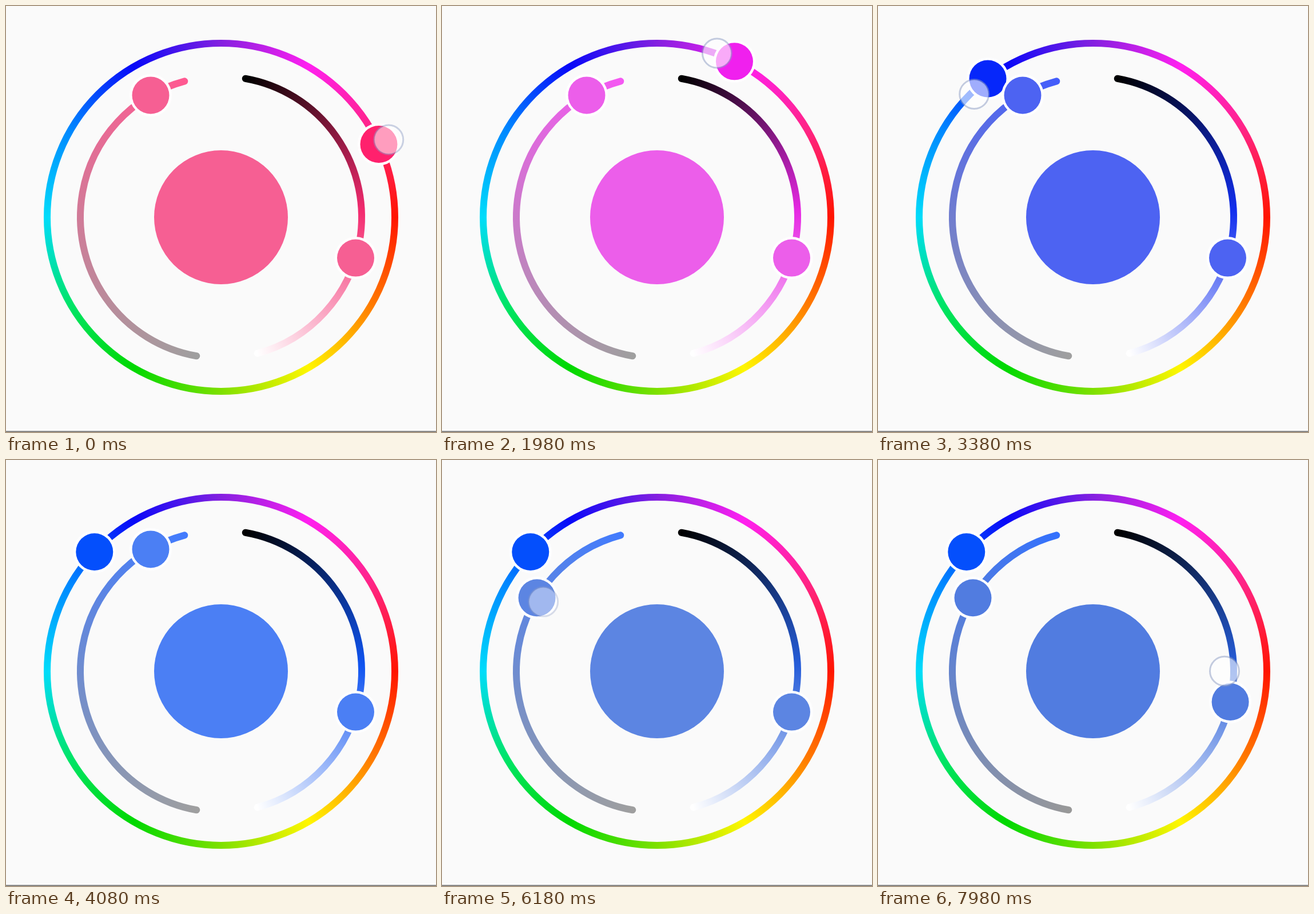
These frames come from a looping animation (752 by 744 pixels, 8 s). An HTML page with a canvas:

```html
<!DOCTYPE html>
<html lang="en">
<head>
<meta charset="utf-8">
<title>Colour wheel</title>
<style>
html, body { margin: 0; width: 100%; height: 100%; overflow: hidden; background: #fafafa; }
canvas { display: block; }
</style>
</head>
<body>
<canvas id="stage" width="752" height="744"></canvas>
<script>
const ctx = document.getElementById('stage').getContext('2d');
const LOOP = 8000, LAG = 200;
const CX = 376, CY = 369, OUTER = 304, INNER = 246, SWEEP = 155;
const LEFT_START = 100, RIGHT_START = -80;
const RAD = Math.PI / 180, TAU = Math.PI * 2;

// Wheel colours, one every 30 degrees
const WHEEL = ['#ff1500', '#ff7a00', '#fff600', '#7ee000', '#00d800', '#00e468',
  '#00dcfa', '#0088ff', '#0808f8', '#8420e0', '#ff20f0', '#ff2484', '#ff1500'];

// Pointer angles while dragging each knob
const HUE_DRAG = [[500, -24.8], [1080, -39.8], [1280, -47.2], [2460, -86.8],
  [2660, -96.5], [3180, -127.2], [3380, -134], [3580, -136.7]];
const HUE_REACH = [[500, 323], [1280, 301], [2660, 309], [3380, 299]];
const SAT_DRAG = [[5560, 240], [5960, 211.4]];
const LIGHT_DRAG = [[7560, 16.8], [7780, 12.6], [7980, 0], [8100, -6]];
const POINTER_ALPHA = [[0, 0.9], [200, 1], [3750, 1], [3950, 0], [5350, 0], [5500, 1],
  [6100, 1], [6350, 0], [7250, 0], [7450, 1]];

const mix = (a, b, k) => a + (b - a) * k;
const rgb = c => `rgb(${c.map(Math.round).join()})`;
const channels = hex => [1, 3, 5].map(n => parseInt(hex.slice(n, n + 2), 16));

function locate(keys, t) {
  let i = 0;
  while (i < keys.length - 2 && t >= keys[i + 1][0]) i++;
  const k = (t - keys[i][0]) / (keys[i + 1][0] - keys[i][0]);
  return [i, Math.min(1, Math.max(0, k))];
}

function linear(keys, t) {
  const [i, k] = locate(keys, t);
  return mix(keys[i][1], keys[i + 1][1], k);
}

// Monotone cubic through the keys, at rest at both ends
function smooth(keys, t) {
  const [i, k] = locate(keys, t);
  const slope = n => (keys[n + 1][1] - keys[n][1]) / (keys[n + 1][0] - keys[n][0]);
  const tangent = n => {
    if (n === 0 || n === keys.length - 1) return 0;
    const a = slope(n - 1), b = slope(n);
    return a * b > 0 ? 2 * a * b / (a + b) : 0;
  };
  const [t0, v0] = keys[i], [t1, v1] = keys[i + 1];
  const d = t1 - t0, k2 = k * k, k3 = k2 * k;
  return v0 + (v1 - v0) * (3 * k2 - 2 * k3)
    + d * ((k3 - 2 * k2 + k) * tangent(i) + (k3 - k2) * tangent(i + 1));
}

function wheelColour(angle) {
  const p = (angle % 360 + 360) % 360 / 30, i = Math.floor(p);
  const a = channels(WHEEL[i]), b = channels(WHEEL[i + 1]);
  return a.map((v, n) => mix(v, b[n], p - i));
}

// Pure colour at the given saturation and lightness, as in HSL
function shade(pure, s, l) {
  const chroma = s * (1 - Math.abs(2 * l - 1));
  return rgb(pure.map(v => 255 * l + chroma * (v - 127.5)));
}

function polar(angle, r) {
  return [CX + r * Math.cos(angle * RAD), CY + r * Math.sin(angle * RAD)];
}

function disc(x, y, r, fill) {
  ctx.fillStyle = fill;
  ctx.beginPath();
  ctx.arc(x, y, r, 0, TAU);
  ctx.fill();
}

function band(r, start, sweep, colours, pad) {
  const paint = ctx.createConicGradient((start - pad) * RAD, CX, CY);
  const step = sweep / (colours.length - 1);
  colours.forEach((c, i) => paint.addColorStop((pad + i * step) / 360, c));
  ctx.strokeStyle = paint;
  ctx.lineWidth = 12;
  ctx.lineCap = pad ? 'round' : 'butt';
  ctx.beginPath();
  ctx.arc(CX, CY, r, start * RAD, (start + sweep) * RAD);
  ctx.stroke();
}

function knob(angle, r, colour) {
  const [x, y] = polar(angle, r);
  disc(x, y, 37, '#ffffff');
  disc(x, y, 32.5, colour);
}

function pointer(t) {
  const alpha = linear(POINTER_ALPHA, t);
  if (!alpha) return;
  const [x, y] = t < 4500 ? polar(smooth(HUE_DRAG, t), smooth(HUE_REACH, t))
    : t < 7000 ? polar(smooth(SAT_DRAG, t), 233)
    : polar(smooth(LIGHT_DRAG, t), 230);
  ctx.save();
  ctx.globalAlpha = alpha;
  disc(x, y, 25, 'rgba(255,255,255,0.62)');
  ctx.lineWidth = 3;
  ctx.strokeStyle = 'rgba(140,155,195,0.5)';
  ctx.beginPath();
  ctx.arc(x, y, 25.5, 0, TAU);
  ctx.stroke();
  ctx.restore();
}

function draw(t) {
  const hue = smooth(HUE_DRAG, t - LAG);
  const sat = smooth(SAT_DRAG, t - LAG);
  const light = smooth(LIGHT_DRAG, t - LAG);
  const pure = wheelColour(hue);
  const s = (sat - LEFT_START) / SWEEP;
  const l = (light - RIGHT_START) / SWEEP;
  const colour = shade(pure, s, l);

  ctx.fillStyle = '#fafafa';
  ctx.fillRect(0, 0, 752, 744);
  ctx.fillStyle = '#888888';
  ctx.fillRect(0, 742, 752, 2);

  band(OUTER, 0, 360, WHEEL, 0);
  band(INNER, LEFT_START, SWEEP, [shade(pure, 0, l), shade(pure, 1, l)], 5);
  band(INNER, RIGHT_START, SWEEP, [0, 0.5, 1].map(v => shade(pure, s, v)), 5);

  disc(CX, CY, 117, colour);
  knob(hue, OUTER, rgb(pure));
  knob(sat, INNER, colour);
  knob(light, INNER, colour);
  pointer(t);
}

const begin = performance.now();
function tick() {
  draw((performance.now() - begin) % LOOP);
  requestAnimationFrame(tick);
}
tick();
</script>
</body>
</html>
```
